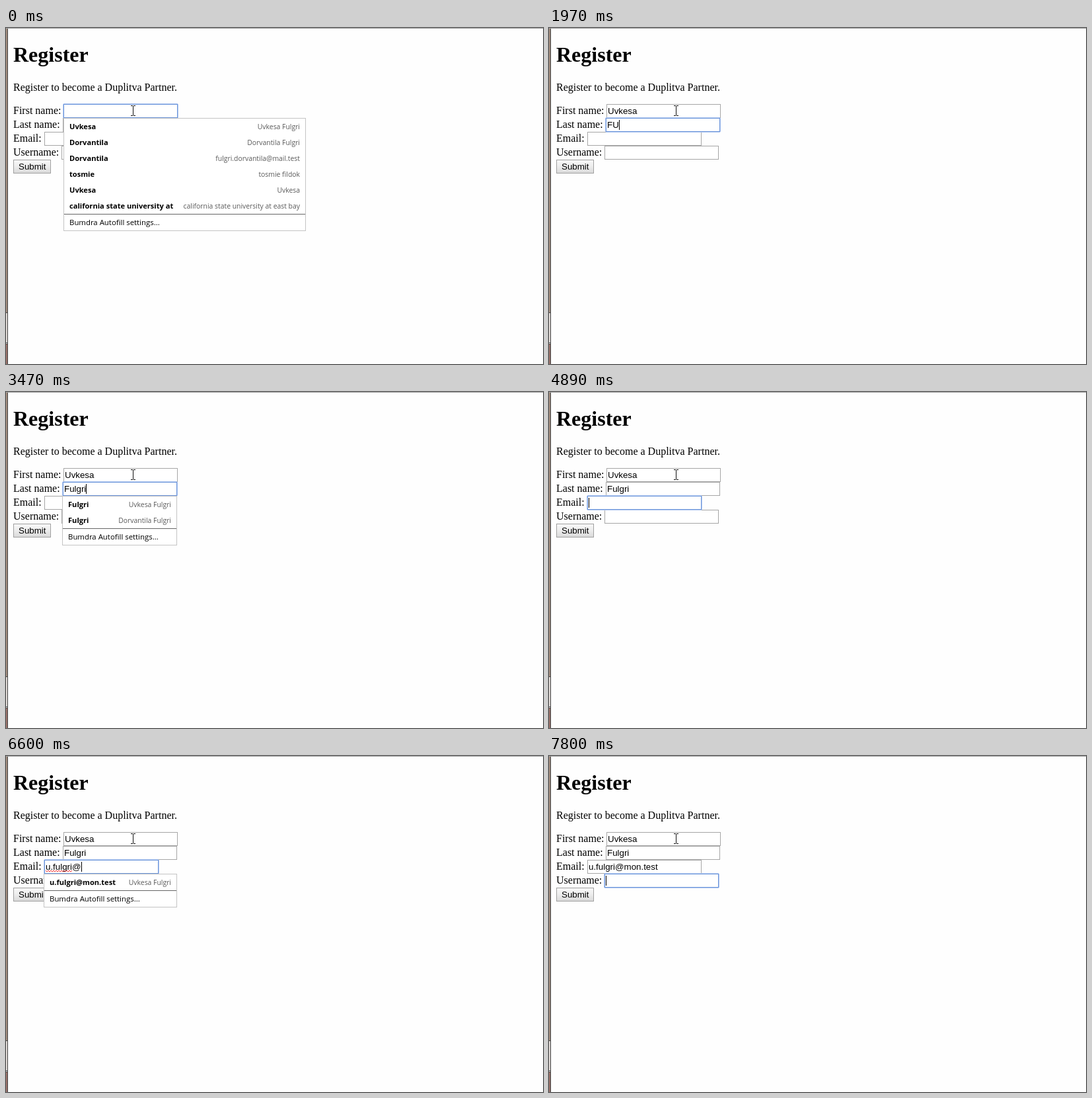
These frames come from a looping animation (813 px wide and 508 px high, 8000 ms). An HTML page:

```html
<!DOCTYPE html>
<html lang="en">
<head>
<meta charset="utf-8">
<title>Register</title>
<style>
  html, body { margin: 0; height: 100%; overflow: hidden; background: #fefefe; }
  svg { display: block; shape-rendering: crispEdges; }
  text { white-space: pre; }
  .page { font: 16px "Liberation Serif", serif; }
  .title { font: bold 32px "Liberation Serif", serif; }
  .value { font: 13.33px "Liberation Sans", sans-serif; }
  .entry { font: bold 11.1px "Open Sans", sans-serif; }
  .hint { font: 10.4px "Open Sans", sans-serif; fill: #5a5a5a; text-anchor: end; }
  .settings { font: 11.4px "Open Sans", sans-serif; }
  .squiggle { fill: none; stroke: #e33; shape-rendering: auto; }
</style>
</head>
<body>
<svg width="813" height="508" viewBox="0 0 813 508">
  <defs>
    <linearGradient id="face" x2="0" y2="1">
      <stop stop-color="#f8f8f8"/><stop offset=".45" stop-color="#eee"/><stop offset="1" stop-color="#d9d9d9"/>
    </linearGradient>
  </defs>
  <rect width="2" height="430" fill="#a08b7d"/>
  <rect y="431" width="2" height="43" fill="#dcd6d2"/>
  <rect y="478" width="2" height="30" fill="#98716a"/>
  <path d="M0 430.5h2M0 475.5h2M0 477.5h2M2.5 0V508" stroke="#444"/>
  <path d="M0 .5H813" stroke="#a3a3a3"/>
  <text class="title" x="11" y="51">Register</text>
  <text class="page" x="11" y="95">Register to become a Duplitva Partner.</text>
  <g id="form"></g>
  <path d="M189 117.5h3m1 0h3M192.5 118v14M189 132.5h3m1 0h3" fill="none" stroke="#111"/>
</svg>
<script>
const LOOP = 8000;
const first = "Uvkesa", last = "Fulgri", email = "u.fulgri@mon.test";
const full = first + " " + last, other = "Dorvantila", third = "tosmie";

const fields = [
  { label: "First name:", x: 87, popupX: 87, y: 115, value: first },
  { label: "Last name:", x: 86, popupX: 85, y: 136, value: last },
  { label: "Email:", x: 58, popupX: 57, y: 157, value: email },
  { label: "Username:", x: 84, popupX: 84, y: 178, value: "" }
];

const popup = (width, ...rows) => ({ width, rows });
const everyone = popup(367,
  [first, full], [other, other + " " + last], [other, "fulgri.dorvantila@mail.test"],
  [third, third + " fildok"], [first, first],
  ["california state university at", "california state university at east bay"]);
const firstNames = popup(174, [first, full], [first, first]);
const family = [[last, full], [last, other + " " + last]];
const lastNames = popup(174, ...family);
const lastNamesF = popup(174, ...family, ["fildok", third + " fildok"]);
const oneEmail = popup(202, [email, full]);
const twoEmails = popup(250, [email, full], ["uvkesa.fulgri@mail.test", full]);

// time, focused field, typed text, popup, caret hidden
const steps = [[0, 0, "", everyone, true]];
const type = (field, text, list, lengths, times) =>
  lengths.forEach((n, i) => steps.push([times[i], field, text.slice(0, n), list]));

type(0, first, firstNames, [1, 2, 3, 5, 6], [370, 540, 710, 870, 1040]);
steps.push([1310, 1, ""], [1970, 1, "FU"], [2500, 1, "F", lastNamesF]);
type(1, last, lastNames, [2, 3, 4, 5, 6], [2770, 2950, 3120, 3300, 3470]);
steps.push([3750, 2, ""], [4360, 2, "", null, true], [4890, 2, ""], [5160, 2, "u", twoEmails]);
type(2, email, oneEmail, [2, 4, 5, 6, 8, 9, 10, 11, 12, 13, 14, 16, 17],
  [5540, 5690, 5840, 5990, 6140, 6600, 6850, 6980, 7110, 7240, 7370, 7500, 7660]);
steps.push([7800, 3, ""]);

const pen = document.createElement("canvas").getContext("2d");
pen.font = '13.33px "Liberation Sans", sans-serif';
const widthOf = text => pen.measureText(text).width;

const text = (kind, x, y, string) => `<text class="${kind}" x="${x}" y="${y}">${string}</text>`;
const box = (x, y, w, h, stroke, fill = "#fff", extra = "") =>
  `<rect x="${x + .5}" y="${y + .5}" width="${w - 1}" height="${h - 1}" stroke="${stroke}" fill="${fill}" ${extra}/>`;

function drawField({ label, x, y }, value, focused) {
  const ring = focused
    ? box(x - 1, y - 1, 175, 23, "#b3c9f0", "none", 'rx="1.5" shape-rendering="auto"') : "";
  return text("page", 11, y + 15, label) + ring +
    box(x, y, 173, 21, focused ? "#6a94da" : "#a6a6a6") + text("value", x + 2, y + 15, value);
}

function drawSquiggle(x, y, width) {
  let d = `M${x} ${y}`;
  for (let i = 2; i <= width; i += 2) d += `L${x + i} ${y + (i % 4 ? 2 : 0)}`;
  return `<path class="squiggle" d="${d}"/>`;
}

function drawPopup(x, y, { width, rows }) {
  const line = y + 1 + 24 * rows.length;
  return box(x, y, width, 24 * rows.length + 27, "#c4c4c4") +
    rows.map(([entry, hint], i) => text("entry", x + 9, y + 17 + 24 * i, entry) +
      text("hint", x + width - 9, y + 17 + 24 * i, hint)).join("") +
    `<path d="M${x + 1} ${line + .5}h${width - 2}" stroke="#666"/>` +
    text("settings", x + 9, line + 17, "Bumdra Autofill settings...");
}

function drawForm([, focus, typed, list, caretHidden]) {
  const { x, y, popupX } = fields[focus];
  const draw = i => drawField(fields[i], i < focus ? fields[i].value : i === focus ? typed : "", i === focus);
  let out = fields.map((_, i) => i === focus ? "" : draw(i)).join("") + draw(focus);
  out += box(11, 199, 57, 21, "#a0a0a0", "url(#face)") + text("value", 19, 214, "Submit");
  if (typed.includes("@")) out += drawSquiggle(x + 2, y + 16, widthOf(typed.split("@")[0]));
  if (!caretHidden)
    out += `<rect x="${Math.round(x + 2 + widthOf(typed))}" y="${y + 3}" width="1" height="15"/>`;
  if (list) out += drawPopup(popupX, y + 21, list);
  return out;
}

const form = document.getElementById("form");
let shown;
function frame() {
  const now = performance.now() % LOOP;
  const step = steps.findLast(s => s[0] <= now);
  if (step !== shown) form.innerHTML = drawForm(shown = step);
  requestAnimationFrame(frame);
}
frame();
</script>
</body>
</html>
```
